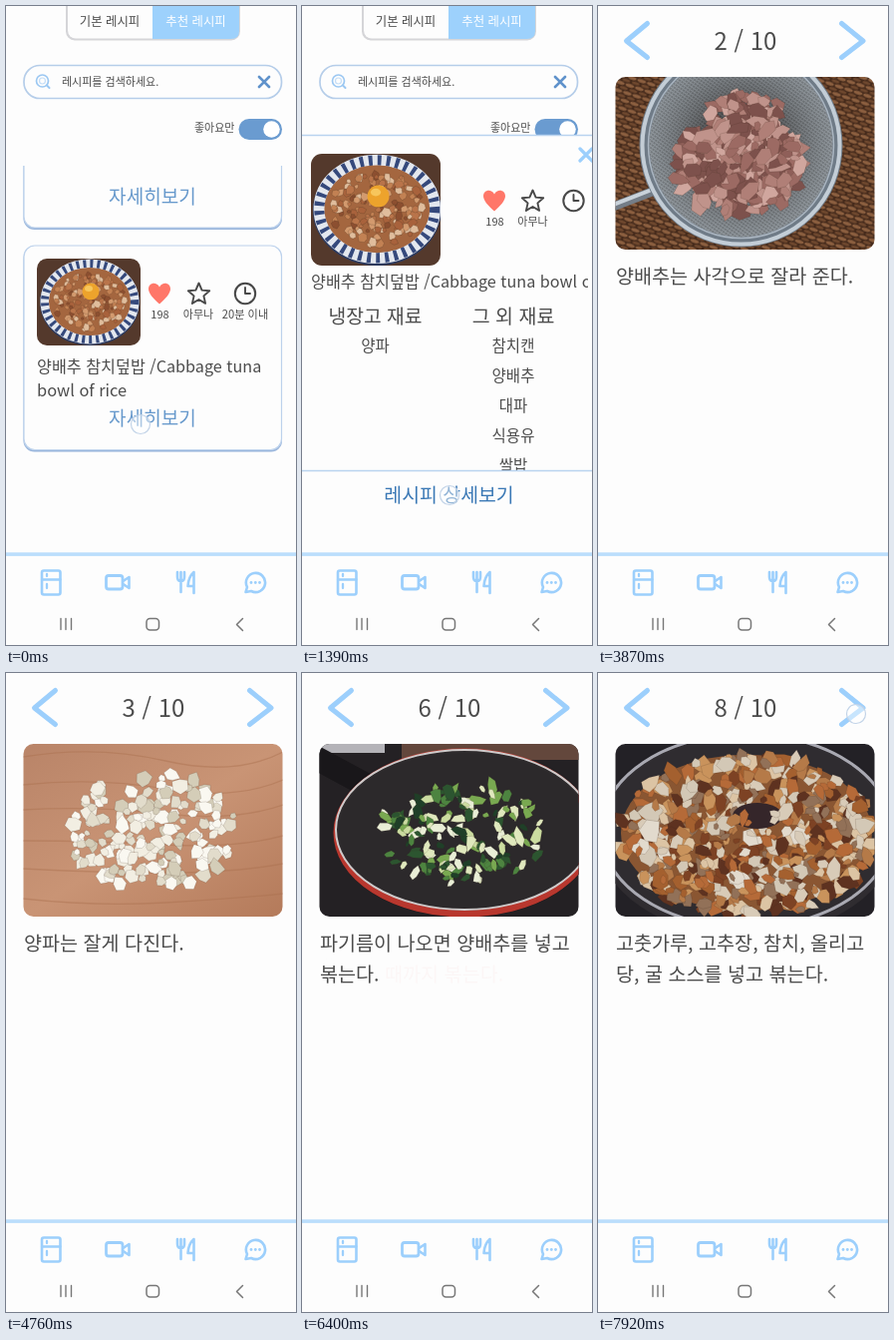
Write an HTML page that moves like this. It is 291 px wide and 640 px high and loops after 8 s.

```html
<!DOCTYPE html>
<html lang="ko">
<head>
<meta charset="utf-8">
<style>
html, body { margin: 0; width: 100%; height: 100%; overflow: hidden; background: #fdfdfd; }
svg { display: block; width: 100vw; height: 100vh; }
text { font-family: "Noto Sans CJK KR", "Noto Sans CJK", "Noto Sans", sans-serif; }
.step text { paint-order: stroke; stroke: #fdfdfd; stroke-width: 14px; stroke-linejoin: round; }
</style>
</head>
<body>
<svg id="stage" viewBox="0 0 291 640"></svg>
<script>
const LOOP = 8000;
const INK = '#4c4c4c', SKY = '#9ccffc', PAPER = '#fdfdfd';
const stage = document.getElementById('stage');

// ---------- markup helpers ----------
const txt = (x, y, s, size, { fill = INK, anchor = 'start', weight = 400 } = {}) =>
  `<text x="${x}" y="${y + size * 0.37}" font-size="${size}" fill="${fill}" text-anchor="${anchor}" font-weight="${weight}">${s}</text>`;
const mid = (x, y, s, size, opt) => txt(x, y, s, size, { ...opt, anchor: 'middle' });
const rect = (x, y, w, h, r, attrs) => `<rect x="${x}" y="${y}" width="${w}" height="${h}" rx="${r}" ${attrs}/>`;
const oval = (x, y, rx, ry, attrs) => `<ellipse cx="${x}" cy="${y}" rx="${rx}" ry="${ry}" ${attrs}/>`;
const dot = (x, y, r, attrs) => oval(x, y, r, r, attrs);
const line = (d, color, w, attrs = '') =>
  `<path d="${d}" fill="none" stroke="${color}" stroke-width="${w}" stroke-linecap="round" stroke-linejoin="round" ${attrs}/>`;
const fill = c => `fill="${c}"`;
const ring = (c, w) => `fill="none" stroke="${c}" stroke-width="${w}"`;

function seeded(seed) {
  return () => {
    seed = (seed * 1664525 + 1013904223) % 4294967296;
    return seed / 4294967296;
  };
}

// Irregular pieces scattered over an ellipse; long > 1 makes them strips.
function pieces(cx, cy, rx, ry, count, size, colors, seed, long = 1) {
  const rnd = seeded(seed);
  let out = '';
  for (let i = 0; i < count; i++) {
    const a = rnd() * 6.283, d = Math.sqrt(rnd()), turn = rnd() * 6.283;
    const s = size * (0.45 + rnd() * 0.7);
    const x = cx + rx * d * Math.cos(a), y = cy + ry * d * Math.sin(a);
    const pts = [];
    for (let k = 0; k < 6; k++) {
      const b = k * 1.047, q = s * (0.6 + rnd() * 0.55);
      const u = q * Math.cos(b) * long, v = q * Math.sin(b);
      pts.push((x + u * Math.cos(turn) - v * Math.sin(turn)).toFixed(1) + ',' +
               (y + u * Math.sin(turn) + v * Math.cos(turn)).toFixed(1));
    }
    out += `<polygon points="${pts.join(' ')}" ${fill(colors[Math.floor(rnd() * colors.length)])}/>`;
  }
  return `<g stroke="#3a2a1c" stroke-opacity=".22" stroke-width=".7">${out}</g>`;
}

// ---------- photos ----------
const bowl =
  rect(0, 0, 104, 87, 0, fill('#54392c')) +
  oval(53, 44, 50, 43, fill('#2b3a60')) +
  oval(53, 43, 45, 38, ring('#e3e7ee', 9)) +
  oval(53, 43, 45, 38, ring('#35497c', 8) + ' stroke-dasharray="3 4"') +
  oval(53, 43, 41, 34, fill('#a4663f')) +
  pieces(53, 43, 36, 29, 150, 3.8, ['#b9744a', '#8c4f30', '#d39a6e', '#a8623c', '#e0bd9c', '#c28153'], 7) +
  dot(54, 33, 8.5, fill('#eda32c')) + oval(52, 30, 4, 3, fill('#f7c65c'));

const flakes = ['#c0938b', '#9c6a63', '#d0a69e', '#7d514c', '#b07f77', '#8f5f59'];
const tuna =
  rect(17, 71, 261, 174, 0, 'fill="url(#wicker)"') +
  line('M10 203L54 186', '#747d87', 9) + line('M10 201L54 184', '#c9d2da', 4) +
  dot(143.5, 139.5, 98, 'fill="url(#mesh)"') + dot(143.5, 139.5, 98, 'fill="url(#shade)"') +
  dot(143.5, 139.5, 97, ring('#6f7b87', 10)) + dot(143.5, 139.5, 99, ring('#c3cdd6', 4)) +
  dot(143.5, 139.5, 93, ring('#aab5c0', 1.5)) +
  oval(146, 152, 56, 42, fill('#7d524c')) +
  pieces(150, 110, 36, 22, 80, 8, flakes, 5, 1.5) +
  pieces(143, 160, 66, 46, 230, 8, flakes, 21, 1.6);

const board = rect(17, 71, 261, 174, 0, 'fill="url(#wood)"') +
  [84, 112, 137, 168, 196, 226].map((y, i) =>
    line(`M17 ${y}Q90 ${y - 12 + i * 4} 160 ${y + 4}T278 ${y - 5}`, '#a9704f', 1.3, 'opacity=".45"')).join('');

const cabbageTones = ['#e6e7db', '#d0d3b6', '#f1f1ea', '#b9bf94', '#dddfcb', '#c9cab4', '#98a26f', '#ecede4'];
const leaves = board + pieces(147, 158, 100, 66, 160, 14, cabbageTones, 11);
const onions = board + pieces(147, 158, 85, 58, 180, 8, ['#f2eee2', '#e2dccb', '#faf8f1', '#d4cdb8'], 13);
const greens = ['#2c5530', '#4d8440', '#79a951', '#cbdca0', '#e9eed6', '#1f3f28', '#dfe8bd'];
const scallion = board +
  line('M84 152Q62 150 61 160Q63 172 84 163', '#3f6e3a', 4) +
  line('M195 118Q215 138 212 166', '#2d5234', 5) +
  line('M30 97L37 98', '#8eb565', 4) + line('M181 217L189 224', '#b3bd72', 3) +
  oval(145, 142, 42, 32, fill('#39603a')) +
  pieces(152, 112, 44, 22, 60, 5, ['#2c5530', '#3e7038', '#1f3f28', '#679a4c'], 15, 2) +
  pieces(146, 146, 58, 40, 150, 4.5, greens, 17, 2.1) +
  pieces(145, 177, 58, 24, 45, 4, ['#e9eed6', '#cbdca0', '#8fb45c'], 19, 2);

const pan = inside =>
  rect(17, 71, 261, 174, 0, fill('#242124')) +
  rect(17, 71, 66, 9, 0, fill('#b4b3b8')) + rect(100, 71, 178, 16, 0, fill('#63473c')) +
  line('M12 84L64 112', '#19171a', 24) +
  oval(163, 161, 131, 84, fill('#19171a')) +
  oval(163, 160, 128, 81, ring('#b8372e', 7)) +
  oval(163, 157, 129, 80, fill('#2c292b') + ' stroke="#cfcaca" stroke-width="2"') + inside;

const cabbagePan = pan(
  oval(160, 165, 104, 56, fill('#a9ae84')) +
  pieces(160, 163, 114, 68, 260, 12, cabbageTones, 29));
const scallionPan = pan(pieces(160, 160, 85, 52, 150, 5, greens, 31, 1.8));
const onionPan = pan(
  oval(160, 165, 104, 56, fill('#b9b88f')) +
  pieces(160, 163, 114, 68, 280, 10, [...cabbageTones, '#f7f2e2'], 37));

const spicy = ['#a4602f', '#c9935c', '#dcc4a4', '#7d4224', '#b57a48', '#d8cbb8', '#5e3220', '#b56a38', '#927158'];
const spicyPan =
  rect(17, 71, 261, 174, 0, fill('#232126')) +
  oval(149, 162, 150, 102, fill('#2f2c30')) + oval(149, 158, 146, 97, ring('#a9a9b2', 3)) +
  oval(149, 160, 126, 78, fill('#8a5632')) +
  pieces(149, 162, 128, 82, 430, 8, spicy, 41, 1.35) +
  pieces(149, 150, 122, 70, 30, 11, ['#e2dacd', '#d3c8b6'], 43) +
  oval(160, 143, 25, 13, fill('#35262a')) +
  pieces(149, 168, 110, 68, 90, 6, spicy, 47, 1.5);

// ---------- icons ----------
const heart = (x, y) =>
  `<path transform="translate(${x} ${y})" d="M0 10.5C-6 5.5-11-.5-11-4.5C-11-11-3-12.5 0-6.5C3-12.5 11-11 11-4.5C11-.5 6 5.5 0 10.5Z" fill="#ff7769"/>`;
function star(x, y) {
  const pts = [...Array(10)].map((_, i) => {
    const r = i % 2 ? 5.2 : 11.3, a = i * Math.PI / 5;
    return `${(x + r * Math.sin(a)).toFixed(1)} ${(y + 0.8 - r * Math.cos(a)).toFixed(1)}`;
  });
  return line('M' + pts.join('L') + 'Z', '#484848', 1.9);
}
const clock = (x, y) => dot(x, y, 10.2, ring('#484848', 2)) + line(`M${x} ${y - 6}v6h5`, '#484848', 1.9);
const cross = (x, y, r, color, w) => line(`M${x - r} ${y - r}l${2 * r} ${2 * r}m0 ${-2 * r}l${-2 * r} ${2 * r}`, color, w);

const card = (y, h) =>
  rect(17.5, y + 2, 259.5, h, 11, fill('#9ab6dc')) +
  rect(18, y, 258.5, h, 11, `${fill(PAPER)} stroke="#bdd2ec" stroke-width="1.2"`);

const LINK = { fill: '#6799cc', weight: 500 };
const list =
  rect(60, -10, 175, 44.5, 9, fill('#d5d5d8')) +
  rect(62, -10, 171.5, 42.5, 8, fill(PAPER)) +
  `<path d="M147 -10H234V25Q234 33 226 33H147Z" fill="#9dd1fc"/>` +
  mid(104, 15, '기본 레시피', 12.4) + mid(190.5, 15, '추천 레시피', 12.4, { fill: '#fff' }) +
  rect(18, 59.5, 258.5, 33, 16, `${fill(PAPER)} stroke="#b5cde9" stroke-width="1.7"`) +
  dot(36.5, 75, 6, ring('#9cc8f2', 1.7)) + dot(36.5, 75, 3, ring('#c4def7', 1.2)) + line('M41 79.5l2.5 2.5', '#9cc8f2', 2) +
  txt(56, 76, '레시피를 검색하세요.', 11) + cross(259, 76, 5, '#5f92cb', 2.6) +
  txt(189, 122, '좋아요만', 11) + rect(233.5, 113, 43.5, 21, 10.5, fill('#6a9bd0')) + dot(266.5, 123.5, 8.3, fill('#fff')) +
  `<g clip-path="url(#listClip)">` + card(100, 122) + mid(147, 191, '자세히보기', 19.1, LINK) + card(240, 204.5) + '</g>' +
  `<g clip-path="url(#thumbClip)"><svg x="31" y="253" width="104" height="87" viewBox="0 0 104 87">${bowl}</svg></g>` +
  heart(154, 288) + star(193.5, 288) + clock(240, 288) +
  mid(154.5, 309, '198', 11) + mid(193, 309, '아무나', 11) + mid(240, 309, '20분 이내', 11.2) +
  txt(31, 361, '양배추 참치덮밥 /Cabbage tuna', 16.2) + txt(31, 385, 'bowl of rice', 16.4) +
  mid(147, 413, '자세히보기', 19.1, LINK);

const edge = y => `<path d="M0 ${y}H291" stroke="#b9d3ef" stroke-width="1.6"/>`;
const sheet =
  rect(0, 129, 291, 520, 0, fill(PAPER)) + edge(129.5) + cross(285, 149, 6, SKY, 3.2) +
  `<g clip-path="url(#dishClip)"><svg x="9" y="148" width="130" height="112" viewBox="0 0 104 87" preserveAspectRatio="xMidYMid slice">${bowl}</svg></g>` +
  heart(193, 195) + star(231.5, 195) + clock(272.5, 195) +
  mid(193.5, 216, '198', 11) + mid(231.5, 216, '아무나', 11) +
  `<g clip-path="url(#titleClip)">${txt(9, 276, '양배추 참치덮밥 /Cabbage tuna bowl of rice', 16.2)}</g>` +
  mid(73.5, 311, '냉장고 재료', 19.3) + mid(212, 311, '그 외 재료', 19.5) + mid(73.5, 340, '양파', 15.5) +
  ['참치캔', '양배추', '대파', '식용유', '쌀밥'].map((s, i) => mid(212, 340 + 30 * i, s, 15.5)).join('') +
  rect(0, 465, 291, 180, 0, fill(PAPER)) + edge(465.5) +
  mid(147.5, 490, '레시피 상세보기', 19.4, { fill: '#3a78b5', weight: 500 });

const nav =
  rect(0, 547, 291, 93, 0, fill(PAPER)) + rect(0, 547.3, 291, 3.6, 0, fill('#bbdefc')) +
  rect(36, 565.5, 18.5, 24, 2, ring(SKY, 2.6)) + line('M36 574.5H54.5M41 569v2M41 579v4', SKY, 2.3) +
  rect(100.5, 570.5, 16.5, 13.5, 2.5, ring(SKY, 2.8)) + line('M117.5 576l6-4v11l-6-4', SKY, 2.6) +
  line('M172 567v5q0 4 3.5 4t3.5-4v-5M175.5 567v20M188.5 588v-21q-5.5 5-6 14h6', SKY, 2.6) +
  line('M240.5 587L242 582A9.600 9.600 0 1 1 246 586Z', SKY, 2.6) +
  [246, 250.300, 254.500].map(x => dot(x, 577.5, 1.4, fill(SKY))).join('') +
  line('M55 613.5v11M60 613.5v11M65.5 613.5v11', '#777', 1.4) +
  rect(141, 613.5, 12.5, 11.5, 3.5, ring('#777', 1.5)) + line('M237.5 613.5l-6 6 6 6', '#777', 1.5);

// ---------- recipe steps: start time, photo, lines ----------
const PHOTO_LAG = 180, GHOST = 90;
const steps = [
  [1480, tuna, '참치캔은 기름을 제거한다.'],
  [3800, leaves, '양배추는 사각으로 잘라 준다.'],
  [4430, onions, '양파는 잘게 다진다.'],
  [5080, scallion, '대파는 잘게 썬다.'],
  [5710, scallionPan, '프라이팬에 식용유, 대파를 넣고', '향이 날 때까지 볶는다.'],
  [6350, cabbagePan, '파기름이 나오면 양배추를 넣고', '볶는다.'],
  [7030, onionPan, '양파를 넣고 볶는다.'],
  [7560, spicyPan, '고춧가루, 고추장, 참치, 올리고', '당, 굴 소스를 넣고 볶는다.']
].map(([at, photo, ...lines]) => ({ at, photo, lines }));

const body = (lines, color) => lines.map((s, i) => txt(18, 271 + 31 * i, s, 19.6, { fill: color })).join('');
const clip = (id, shape) => `<clipPath id="${id}">${shape}</clipPath>`;

stage.innerHTML = `<defs>
  ${clip('listClip', rect(0, 160, 291, 387, 0, ''))}
  ${clip('thumbClip', rect(31, 253, 104, 87, 10, ''))}
  ${clip('dishClip', rect(9, 148, 130, 112, 11, ''))}
  ${clip('titleClip', rect(0, 262, 287, 30, 0, ''))}
  ${clip('photoClip', rect(17.5, 71, 260, 173, 10, ''))}
  <pattern id="wicker" width="10" height="8" patternUnits="userSpaceOnUse" patternTransform="rotate(18)">
    ${rect(0, 0, 10, 8, 0, fill('#452a1b'))}${oval(5, 2, 4.5, 1.8, fill('#8d6040'))}${oval(0, 6, 4, 1.6, fill('#6f482e'))}${oval(10, 6, 4, 1.6, fill('#6f482e'))}
  </pattern>
  <pattern id="mesh" width="3" height="3" patternUnits="userSpaceOnUse" patternTransform="rotate(35)">
    ${rect(0, 0, 3, 3, 0, fill('#5f6264'))}${rect(0, 0, 3, 1, 0, fill('#92979b'))}${rect(0, 0, 1, 3, 0, fill('#858a8e'))}
  </pattern>
  <radialGradient id="shade"><stop offset=".4" stop-color="#2c2a2a" stop-opacity=".5"/><stop offset="1" stop-color="#a9b4bd" stop-opacity=".35"/></radialGradient>
  <linearGradient id="wood" x2="1" y2="1"><stop stop-color="#b98468"/><stop offset=".5" stop-color="#c99475"/><stop offset="1" stop-color="#b47a5a"/></linearGradient>
  </defs>
  ${rect(0, 0, 291, 640, 0, fill(PAPER))}
  <g id="list">${list}</g>
  <g id="sheet">${sheet}</g>
  <g id="recipe">
    ${rect(0, 0, 291, 547, 0, fill(PAPER))}
    ${steps.map(s => `<g class="ghost">${body(s.lines, '#fbeeee')}</g>`).join('')}
    ${steps.map((s, i) => `<g class="step">${mid(148, 35, `${i + 1} / 10`, 24)}${body(s.lines, INK)}</g>`).join('')}
    <g id="back">${line('M49.5 17.5L28.5 35L49.5 51.5', SKY, 5)}</g>
    ${line('M244.5 17.5L266 35L244.5 51.5', SKY, 5)}
    <g clip-path="url(#photoClip)">${steps.map(s => `<g class="photo">${s.photo}</g>`).join('')}</g>
  </g>
  ${nav}
  <circle id="touch" r="9.5" fill="#fff" fill-opacity=".45" stroke="#c3d4e8" stroke-width="1.2"/>`;

const $ = id => document.getElementById(id);
const all = name => [...stage.querySelectorAll('.' + name)];
const photos = all('photo'), ghosts = all('ghost'), labels = all('step');
const [listEl, sheetEl, recipeEl, backEl, touchEl] = ['list', 'sheet', 'recipe', 'back', 'touch'].map($);

const show = (el, on) => { el.style.display = on ? '' : 'none'; };
const unit = (t, a, b) => Math.min(1, Math.max(0, (t - a) / (b - a)));

// touch start time, x, y
const taps = [[-60, 135, 419], [1290, 148, 490],
  ...steps.slice(1).map((s, i) => [s.at - 170, 260 + i % 3 * 2, 44]), [7830, 259, 41]];

function draw(t) {
  const rise = 1 - (1 - unit(t, 60, 400)) ** 3;
  const enter = unit(t, steps[0].at, 1650);
  show(listEl, enter < 1);
  show(sheetEl, rise > 0 && enter < 1);
  sheetEl.setAttribute('transform', `translate(0 ${(418 * (1 - rise)).toFixed(2)})`);
  show(recipeEl, enter > 0);
  recipeEl.setAttribute('opacity', enter);

  const page = steps.filter(s => t >= s.at).length - 1;
  const photo = steps.filter(s => t >= s.at + PHOTO_LAG).length - 1;
  show(backEl, page > 0);
  labels.forEach((el, i) => show(el, i === page));
  photos.forEach((el, i) => show(el, i === photo));
  const fade = page > 0 ? 1 - unit(t, steps[page].at, steps[page].at + GHOST) : 0;
  ghosts.forEach((el, i) => {
    show(el, i === page - 1 && fade > 0);
    el.setAttribute('opacity', fade);
  });

  const tap = taps.find(([at]) => t >= at && t < at + 210);
  show(touchEl, tap);
  if (tap) {
    touchEl.setAttribute('cx', tap[1]);
    touchEl.setAttribute('cy', tap[2]);
    touchEl.setAttribute('opacity', 1 - unit(t, tap[0] + 120, tap[0] + 210));
  }
}

const start = performance.now();
function tick(now) {
  draw(Math.max(0, now - start) % LOOP);
  requestAnimationFrame(tick);
}
draw(0);
requestAnimationFrame(tick);
</script>
</body>
</html>
```
